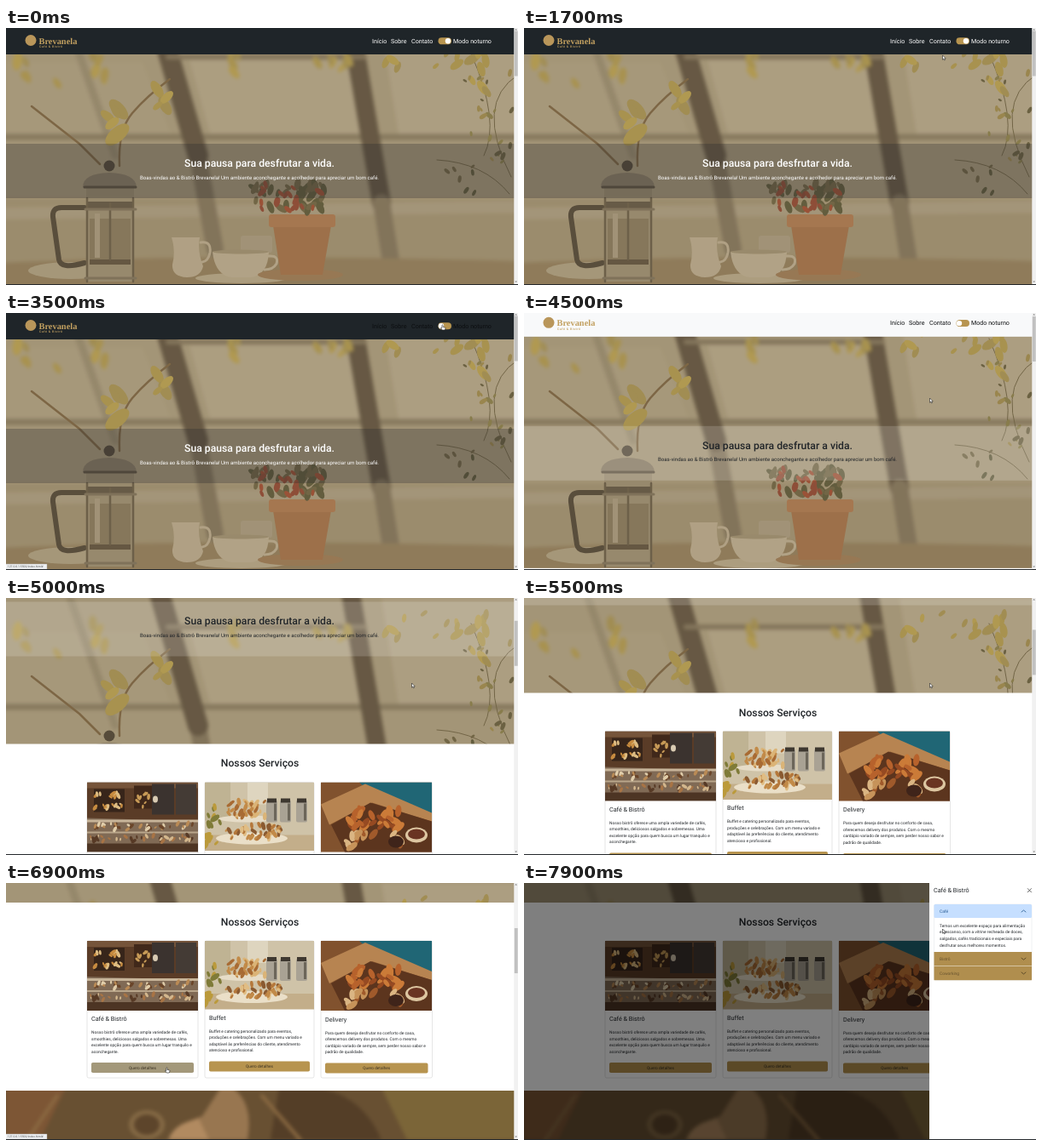
These frames come from a looping animation (600x302 px, 8 s). An HTML page:

```html
<!DOCTYPE html>
<html lang="pt-BR">
<head>
<meta charset="utf-8">
<title>Café</title>
<style>
html, body { margin: 0; height: 100%; overflow: hidden; background: #fff; }
svg { display: block; width: 600px; height: 302px; font-family: Roboto, sans-serif; text-rendering: geometricPrecision; }
.soft { filter: blur(2px); }
.photo { filter: blur(.7px); }
.mid { text-anchor: middle; }
.head { font-size: 12.2px; font-weight: 500; text-anchor: middle; }
.line { fill: none; stroke-linecap: round; stroke-linejoin: round; }
</style>
</head>
<body>
<svg id="stage" viewBox="0 0 600 302"></svg>
<script>
const LOOP = 8000, GOLD = '#b7944f', INK = '#212529';
const SERVICES_TOP = 303, SERVICES_END = 524;

let seed = 7;
const rnd = () => (seed = seed * 16807 % 2147483647) / 2147483647;
const rect = (x, y, w, h, fill, extra = '') =>
  `<rect x="${x}" y="${y}" width="${w}" height="${h}" fill="${fill}" ${extra}/>`;
const oval = (x, y, rx, ry, fill) => `<ellipse cx="${x}" cy="${y}" rx="${rx}" ry="${ry}" fill="${fill}"/>`;
const shape = (d, fill) => `<path d="${d}" fill="${fill}"/>`;
const line = (d, color, w) => `<path class="line" d="${d}" stroke="${color}" stroke-width="${w}"/>`;
const text = (x, y, size, fill, str, extra = '') =>
  `<text x="${x}" y="${y}" font-size="${size}" fill="${fill}" ${extra}>${str.replace(/&/g, '&amp;')}</text>`;
const lines = (x, y, rows) => rows.map((row, i) => text(x, y + i * 7.6, 4.85, INK, row)).join('');

// Scatter of small ovals around a point
function scatter(x, y, w, h, count, size, colors) {
  let out = '';
  for (let i = 0; i < count; i++) {
    const cx = x + (rnd() - .5) * w, cy = y + (rnd() - .5) * h, r = size * (.6 + rnd() * .7);
    out += `<ellipse rx="${r * .5}" ry="${r}" fill="${colors[i % colors.length]}"
      transform="translate(${cx} ${cy}) rotate(${rnd() * 120 - 60})"/>`;
  }
  return out;
}

function greenhouse() {
  const leaf = ['#a8924a', '#a08c4e', '#b29a4c'], green = ['#5a5537', '#6b6040'], frame = '#5e503d';
  return `<g class="soft">
    ${rect(-5, -5, 610, 312, '#a39577')}
    ${shape('M215 38H402L418 128H240z', '#ad9f82')}${shape('M440 0H600V125H460z', '#ad9f83')}
    ${shape('M0 40H160L195 128H0z', '#a6987b')}
    ${line('M75 0L128 150', '#93866a', 9)}
    ${line('M-5 128H605', '#83765c', 7)}${rect(-5, 200, 610, 76, '#9a8b6c')}
    ${line('M-5 218L605 210', '#a3957a', 14)}
    ${line('M225 150L245 260', '#7d6f57', 20)}${line('M180 -5L225 150', frame, 24)}
    ${line('M404 -5L440 205', frame, 22)}${line('M440 205L452 280', '#7d6f57', 20)}
    ${line('M190 34L420 34', '#7f7158', 6)}
    ${shape('M-5 276Q250 264 605 274V307H-5z', '#8c7857')}
    ${scatter(90, 48, 60, 40, 7, 9, leaf)}${scatter(15, 45, 24, 30, 4, 9, leaf)}
    ${scatter(265, 42, 14, 24, 4, 9, leaf)}${scatter(375, 40, 60, 20, 6, 8, leaf)}
    </g><g class="photo">
    ${line('M192 60Q165 80 148 100T133 162M30 92L86 136L110 160', '#77603f', 2.5)}
    ${line('M600 55Q548 88 592 175M545 30Q580 110 560 150M505 155Q560 158 590 195', '#6b5f41', 1)}
    ${scatter(125, 108, 14, 44, 5, 14, leaf)}${scatter(183, 92, 14, 40, 4, 11, leaf)}
    ${scatter(490, 32, 100, 30, 10, 7, leaf)}${scatter(555, 48, 30, 60, 9, 8, leaf)}
    ${scatter(563, 105, 60, 110, 22, 4, ['#847947', '#635a3b', '#988449'])}
    ${scatter(530, 180, 45, 45, 8, 3.5, green)}
    ${oval(76, 285, 50, 10, '#a5977a')}
    ${line('M92 211H65Q54 211 55 222L62 272Q64 284 92 276', '#4f4434', 6)}
    ${shape('M94 188H150V298H94z', '#95876c')}${rect(96, 204, 54, 9, '#5f5341')}
    ${shape('M98 224H146V272H98z', '#827358')}${rect(98, 272, 48, 6, '#5c4f3b')}
    ${line('M95 200V298M149 200V298M122 206V272', '#655943', 2.5)}${line('M93 213H152M93 294H152', '#7a6d57', 3)}
    ${rect(104, 218, 6, 52, '#a09277')}
    ${shape('M90 187Q90 171 121 170Q152 171 153 187z', '#847762')}${line('M92 187H152', '#574c3b', 3)}
    ${oval(121, 162, 6.5, 6.5, '#4b4132')}
    ${shape('M194 246H227Q224 262 231 280Q228 293 212 293Q194 292 195 278Q199 262 194 246z', '#b1a286')}
    ${line('M228 252Q241 250 239 264Q237 274 230 275', '#b1a286', 3)}
    ${rect(275, 244, 37, 20, '#a09277', 'rx="3"')}
    ${oval(276, 294, 54, 6, '#ad9e81')}
    ${shape('M242 263H308Q307 290 287 293H264Q245 290 242 263z', '#b3a488')}${oval(275, 263, 33, 2.5, '#97886b')}
    ${line('M308 268Q320 267 317 277Q313 284 303 284', '#b3a488', 3)}
    ${oval(345, 290, 50, 7, '#957450')}
    ${shape('M313 232H381L371 290H322z', '#9c6b44')}${rect(308, 219, 78, 15, '#a5734b', 'rx="3"')}
    ${scatter(331, 199, 84, 32, 40, 6.5, green)}${scatter(331, 200, 78, 36, 19, 5, ['#8b4430', '#98492f'])}
    </g>${rect(0, 0, 600, 302, '#a39577', 'opacity=".12"')}`;
}

function table() {
  return `<g class="soft">
    ${rect(-5, 200, 610, 110, '#685032')}${shape('M0 200H90L40 302H0z', '#7d5635')}
    ${shape('M420 200H600V302H470z', '#7b6538')}
    ${oval(165, 284, 21, 17, '#856a45')}${oval(165, 284, 15, 12, '#5d452b')}
    ${shape('M255 235Q292 250 283 302H190Q205 282 230 274z', '#987650')}
    ${shape('M190 302Q197 282 226 277L238 302z', '#b18a60')}
    ${shape('M320 240Q410 230 440 302H310z', '#543e27')}${line('M300 250L345 302M60 250L25 302', '#8b6a42', 4)}
    </g>`;
}

const pictures = [
  () => rect(0, 0, 130, 82, '#5a3c27') + rect(0, 0, 130, 7, '#75543a') +
    rect(8, 8, 36, 27, '#37251a') + rect(55, 4, 24, 27, '#40281a') +
    rect(76, 2, 26, 36, '#3b332f') + rect(104, 2, 24, 36, '#443b35') +
    scatter(25, 15, 32, 5, 12, 3.2, ['#c78b3f', '#ddbc82']) + scatter(25, 28, 32, 5, 12, 3.2, ['#c78b3f', '#ddbc82']) +
    scatter(66, 20, 18, 18, 8, 2.8, ['#c89b57']) + oval(80, 20, 3, 4, '#d9cbb3') +
    shape('M0 42L130 46V82H0z', '#806a55') + rect(0, 44, 130, 3, '#c7b499') + rect(0, 58, 130, 2, '#b9a68b') +
    rect(0, 72, 130, 10, '#4d3524') +
    scatter(65, 52, 124, 7, 36, 3, ['#b98a55', '#e0cdaa', '#6a4529']) +
    scatter(65, 66, 124, 7, 36, 3, ['#a87445', '#d3b78d', '#573a26']),
  () => rect(0, 0, 128, 82, '#cfc3a8') + rect(0, 0, 30, 45, '#bfb393') + rect(50, 0, 24, 26, '#ded5bf') +
    rect(0, 62, 128, 20, '#c3ae8a') + oval(48, 43, 32, 4, '#e6dcc7') + oval(55, 66, 42, 7, '#eadfc8') +
    [72, 88, 107].map(x => rect(x, 21, 13, 26, '#a9a294', 'rx="2"') + rect(x + 1, 19, 11, 5, '#3e3830') +
      rect(x + 9, 25, 3, 20, '#6c665a')).join('') +
    scatter(50, 32, 44, 20, 32, 4, ['#c28a48', '#a86b34', '#dbb477']) +
    scatter(55, 58, 66, 16, 42, 4, ['#c28a48', '#b5783b', '#e0bd84', '#8a5a31']) +
    scatter(10, 52, 18, 46, 14, 5, ['#7f7b38', '#bb9a3b']),
  () => rect(0, 0, 130, 82, '#81522e') + shape('M45 0H130V44L66 20z', '#206675') +
    shape('M0 26L52 2L130 36V46L60 24L10 50z', '#b78451') + shape('M12 50L58 24L130 46V82H28z', '#5c351e') +
    scatter(62, 44, 60, 26, 32, 7, ['#b7622c', '#cb7b38', '#964a22']) +
    scatter(66, 68, 82, 20, 20, 6, ['#c6935a', '#a05a2b', '#dab583']) +
    oval(112, 62, 13, 9, '#ddc6a1') + oval(112, 61, 10, 6, '#693422') + oval(88, 70, 9, 7, '#3f241a')
];

function card(i, x, w, imageH, title, rows) {
  const y = 348 + imageH;
  return rect(x, 348, w, 161, '#fff', 'stroke="#d6d6d6" stroke-width=".6" rx="2"') +
    `<svg x="${x}" y="348" width="${w}" height="${imageH}"><g class="photo">${pictures[i]()}</g></svg>` +
    text(x + 5, y + 12, 7.2, INK, title) + lines(x + 5, y + 27, rows) +
    rect(x + 5, y + 61, w - 10, 12, GOLD, `rx="1.8" id="button${i}"`) +
    text(x + w / 2, y + 68.8, 4.75, '#3a3123', 'Quero detalhes', 'class="mid"');
}

const chevron = (y, up, color) => line(`M583 ${y + up}l2.5 ${-2 * up}l2.5 ${2 * up}`, color, .8);
const closedItem = (y, label) => rect(480.5, y, 114.5, 16.4, '#b08e4e') +
  text(487, y + 9.9, 4.85, '#67532f', label) + chevron(y + 8.2, -1, '#4c3d20');

document.getElementById('stage').innerHTML = `
  <clipPath id="lower"><rect id="lowerBox" width="600" height="302"/></clipPath>
  ${greenhouse()}
  <g clip-path="url(#lower)">${table()}</g>
  <g id="page">
    <rect id="navbar" width="600" height="31"/>
    <circle cx="29" cy="14.5" r="6.5" fill="#b9965a"/>
    ${text(38.5, 18.5, 10.4, '#c2a060', 'Brevanela', 'font-family="Liberation Serif, serif" font-weight="700"')}
    ${text(39, 23.4, 3.6, '#c2a060', 'Café & Bistrô', 'letter-spacing=".5" font-weight="500"')}
    <g id="links">
      ${[[429, 'Início'], [451, 'Sobre'], [475, 'Contato'], [524, 'Modo noturno']]
        .map(([x, s]) => text(x, 17.5, 7.15, 'currentColor', s)).join('')}
    </g>
    ${rect(506.5, 11.3, 15.5, 8, GOLD, 'rx="4"')}<circle id="knob" cy="15.3" r="3.2" fill="#fff"/>
    <rect id="band" y="136" width="600" height="64"/>
    <g id="welcome">
      ${text(297, 163, 12.2, 'currentColor', 'Sua pausa para desfrutar a vida.', 'class="head"')}
      ${text(297, 177.6, 6.08, 'currentColor', 'Boas-vindas ao & Bistrô Brevanela! Um ambiente aconchegante e acolhedor para apreciar um bom café.', 'class="mid"')}
    </g>
    ${rect(0, SERVICES_TOP, 600, SERVICES_END - SERVICES_TOP, '#fff')}
    ${text(297.5, 330, 12.2, INK, 'Nossos Serviços', 'class="head"')}
    ${card(0, 95, 130, 82, 'Café & Bistrô', ['Nosso bistrô oferece uma ampla variedade de cafés,',
      'smoothies, deliciosos salgados e sobremesas. Uma', 'excelente opção para quem busca um lugar tranquilo e', 'aconchegante.'])}
    ${card(1, 233, 128, 80.6, 'Buffet', ['Buffet e catering personalizado para eventos,',
      'produções e celebrações. Com um menu variado e', 'adaptável às preferências do cliente, atendimento', 'atencioso e profissional.'])}
    ${card(2, 369, 130.5, 82.6, 'Delivery', ['Para quem deseja desfrutar no conforto de casa,',
      'oferecemos delivery dos produtos. Com o mesmo', 'cardápio variado de sempre, sem perder nosso sabor e', 'padrão de qualidade.'])}
  </g>
  <g id="scrollbar">
    ${rect(595.3, 0, 4.7, 302, '#f1f1f1')}
    ${shape('M596.4 2.4h2.6l-1.3-1.5zM596.4 297.6h2.6l-1.3 1.5z', '#777')}
    ${rect(595.8, 3.5, 3.9, 53, '#c1c1c1', 'id="thumb"')}
  </g>
  <g id="status">
    ${rect(-1, 295, 49, 6, '#eef0f2', 'stroke="#b5b5b5" stroke-width=".4"')}
    ${text(1.8, 299.3, 3.4, '#555', '127.0.0.1:5500/index.html#')}
  </g>
  ${rect(0, 0, 600, 302, '#000', 'id="backdrop"')}
  <g id="panel">
    ${rect(475, 0, 125, 302, '#fff')}
    ${text(480, 11.4, 7.2, INK, 'Café & Bistrô')}
    ${line('M590.3 6.6l4.2 4.2m0-4.2l-4.2 4.2', '#555', .9)}
    ${rect(480.5, 25, 114.5, 89.3, '#fff', 'rx="2" stroke="#dee2e6" stroke-width=".5"')}
    ${rect(480.5, 25, 114.5, 16, '#c6dfff', 'rx="1.5"')}
    ${text(487, 34.8, 4.85, '#23578f', 'Café')}${chevron(33, 1, '#23578f')}
    ${lines(487, 51.8, ['Temos um excelente espaço para alimentação', 'e descanso, com a vitrine recheada de doces,',
      'salgados, cafés tradicionais e especiais para', 'desfrutar seus melhores momentos.'])}
    ${closedItem(81, 'Bistrô')}${closedItem(97.8, 'Coworking')}
  </g>
  ${rect(0, 301, 600, 1, '#25292c')}
  <g id="cursor" stroke="#222" stroke-width=".6" stroke-linejoin="round" fill="#fff">
    <path id="arrow" d="M0 0V5.2L1.2 4.1L2 5.9L2.9 5.5L2.1 3.8H3.7z"/>
    <path id="hand" d="M-.6 .4Q0-.6.6.4V2.4L3 3Q3.6 3.2 3.4 4.2L2.8 6H-.4L-2 3.6Q-1.6 2.8-.6 3.6z"/>
  </g>`;

const $ = Object.fromEntries([...document.querySelectorAll('[id]')].map(el => [el.id, el]));
const show = (el, on) => el.setAttribute('visibility', on ? 'visible' : 'hidden');
const move = (el, x, y) => el.setAttribute('transform', `translate(${x} ${y})`);
const smooth = p => p * p * (3 - 2 * p);

// Eased value of a track of [time, ...values]
function at(track, t) {
  const i = track.findIndex(k => k[0] > t);
  if (i === 0) return track[0].slice(1);
  if (i < 0) return track[track.length - 1].slice(1);
  const a = track[i - 1], b = track[i], p = smooth((t - a[0]) / (b[0] - a[0]));
  return a.slice(1).map((v, k) => v + (b[k + 1] - v) * p);
}

const scrollTrack = [[4450, 0], [5000, 131.5], [5300, 187.5], [5450, 187.5], [5800, 257], [6000, 280]];
const cursorTrack = [[1100, 600, 225], [1700, 490.5, 32], [1900, 488, 28], [2200, 486, 15], [2800, 511.5, 14],
  [4200, 511.5, 14], [4500, 475.5, 100], [6000, 475.5, 100], [6700, 188.5, 217], [7150, 188.5, 217], [7750, 490.5, 54]];
const panelTrack = [[7000, 0], [7300, 1]];
const knobTrack = [[3400, 518], [3500, 510]];

function draw(now) {
  const t = now % LOOP, dark = t < 3600;
  const [scroll] = at(scrollTrack, t), [open] = at(panelTrack, t);
  const onToggle = t >= 2100 && t < 4250, onButton = t >= 6650 && t < 7200;

  move($.page, 0, -scroll);
  move($.thumb, 0, scroll * .177);
  $.lowerBox.setAttribute('y', SERVICES_END - scroll);

  $.navbar.setAttribute('fill', dark ? '#1f2529' : '#f8f9fa');
  $.links.setAttribute('color', t < 3500 ? '#fff' : '#0c0e10');
  $.band.setAttribute('fill', dark ? 'rgba(40,40,45,.3)' : 'rgba(255,255,255,.16)');
  $.welcome.setAttribute('color', dark ? '#fff' : INK);
  $.knob.setAttribute('cx', at(knobTrack, t)[0]);
  $.button0.setAttribute('fill', onButton ? '#a3987a' : GOLD);

  move($.panel, 125 * (1 - open), 0);
  show($.panel, open > 0);
  show($.scrollbar, open === 0);
  $.backdrop.setAttribute('opacity', open * .5);

  move($.cursor, ...at(cursorTrack, t));
  show($.arrow, t >= 1100 && !onToggle && !onButton);
  show($.hand, onToggle || onButton);
  show($.status, onToggle || onButton);
}

const start = performance.now();
(function tick() {
  draw(performance.now() - start);
  requestAnimationFrame(tick);
})();
</script>
</body>
</html>
```
